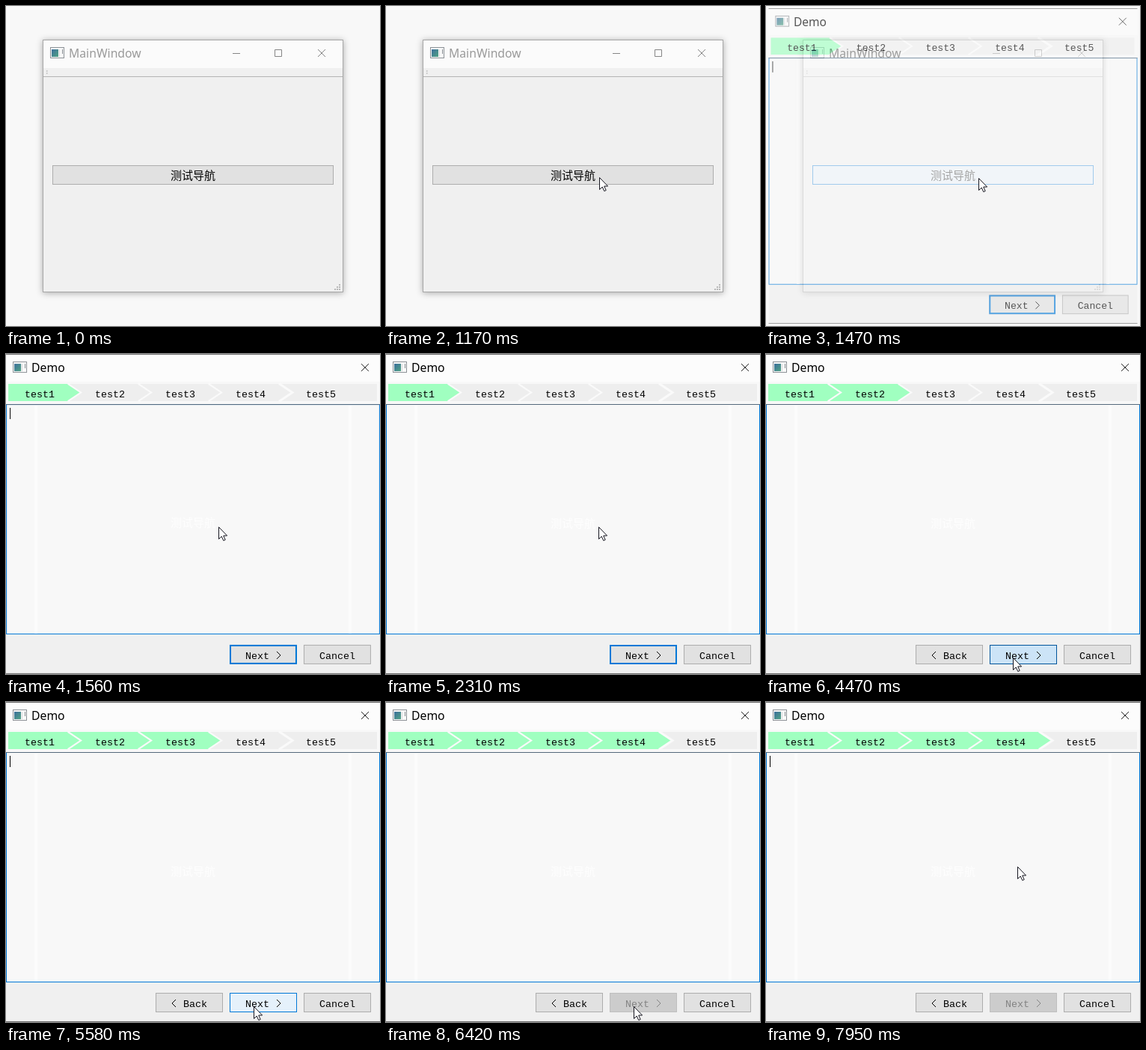
Recreate the animation shown at these times as an HTML page. Size 500 by 428 pixels, loop 8 s.

```html
<!DOCTYPE html>
<html lang="zh">
<head>
<meta charset="utf-8">
<title>Wizard navigation</title>
<style>
  html, body { margin: 0; width: 100%; height: 100%; overflow: hidden; background: #f8f8f8; }
  svg { display: block; width: 500px; height: 428px; }
  .title { font: 15.75px "Noto Sans", "Open Sans", sans-serif; }
  .mono { font: 13.33px "Liberation Mono", "Noto Sans Mono", monospace; text-anchor: middle; white-space: pre; }
  .cjk { font: 15px "Noto Sans CJK SC", "Noto Sans CJK", sans-serif; text-anchor: middle; }
  .line { fill: none; stroke-width: 1; }
  .shadow { filter: drop-shadow(0 1px 4px rgba(0, 0, 0, .32)); }
</style>
</head>
<body>
<svg viewBox="0 0 500 428">
  <defs>
    <linearGradient id="teal" x2="1" y2="1">
      <stop stop-color="#3d6f9c"/><stop offset="1" stop-color="#4fa283"/>
    </linearGradient>
    <g id="icon">
      <rect x=".5" y=".5" width="18" height="14" fill="#fafafa" stroke="#8c9196"/>
      <rect x="2" y="3" width="9" height="10" fill="url(#teal)"/>
      <path d="M12.5 3V13" stroke="#d5d8da"/>
      <path d="M16.5 3V9" stroke="#858b91"/>
    </g>
  </defs>

  <rect width="500" height="428" fill="#f8f8f8"/>

  <g id="main">
    <rect class="shadow" x="49.5" y="45.5" width="401" height="337" fill="#f0f0f0" stroke="#a6a6a6"/>
    <rect x="50" y="46" width="400" height="37" fill="#fbfbfb"/>
    <use href="#icon" x="59" y="55"/>
    <text id="mainTitle" class="title" x="84" y="69">MainWindow</text>
    <path class="line" stroke="#858585" d="M303 63.5H313M359.5 58.5H368.5V67.5H359.5ZM417 58L427 68M427 58L417 68"/>
    <path d="M54 87h1.5M54 90h1.5" stroke="#9a9a9a"/>
    <path d="M50 94.5H450" stroke="#b4b4b4"/>
    <rect id="mainButton" x="62.5" y="213.5" width="375" height="25"/>
    <text class="cjk" x="250" y="231.5">测试导航</text>
    <path id="grip" fill="#b8b8b8"/>
  </g>

  <g id="dialog">
    <rect width="500" height="428" fill="#f0f0f0"/>
    <rect width="500" height="37" fill="#fcfcfc"/>
    <use href="#icon" x="9" y="10"/>
    <text class="title" x="34" y="24">Demo</text>
    <path class="line" stroke="#222" d="M475 13L485 23M485 13L475 23"/>
    <rect x="0" y="37" width="500" height="30" fill="#f8f8f8"/>
    <rect x="3" y="40" width="493" height="23" fill="#eeeeee"/>
    <g id="steps"></g>
    <rect x=".5" y="67.5" width="499" height="307" fill="#f8f8f8" stroke="#0078d7"/>
    <path d="M0 67.5H500" stroke="#55697c"/>
    <path d="M40 69V374M460 69V374" stroke="#fcfcfc" stroke-width="4"/>
    <text class="cjk" x="250" y="231.5" fill="#fefefe">测试导航</text>
    <path id="caret" d="M5.5 72V87" stroke="#000"/>
    <g id="buttons"></g>
    <path d="M0 .5H500M0 427.5H500" stroke="#707070"/>
  </g>

  <path id="cursor" d="M.5 .5V16.5L4.2 13L6.8 18.6L9.2 17.5L6.7 12H11.6Z" fill="#fff" stroke="#15151f" stroke-linejoin="round"/>
</svg>
<script>
const LOOP = 8000, TICK = 30, PITCH = 94;
const $ = id => document.getElementById(id);

function add(parent, tag, attrs, text = '') {
  const node = document.createElementNS('http://www.w3.org/2000/svg', tag);
  set(node, attrs);
  node.textContent = text;
  return parent.appendChild(node);
}
function set(node, attrs) {
  for (const key in attrs) node.setAttribute(key, attrs[key]);
}

// Size grip dots
let dots = '';
for (let row = 0; row < 3; row++)
  for (let col = 2 - row; col < 3; col++) dots += `M${439 + col * 3} ${372 + row * 3}h2v2h-2z`;
set($('grip'), { d: dots });

// Step bar
const arrows = [];
for (let i = 0; i < 5; i++) {
  const x = i * PITCH, notch = i ? x + 8 : 3;
  const shape = i ? `M${x - 9} 40H${x + 82}L${x + 99} 51.5L${x + 82} 63H${x - 9}L${notch} 51.5Z`
                  : 'M3 40H82L99 51.5L82 63H3Z';
  if (i < 4) {
    arrows.push(add($('steps'), 'path', { d: shape, fill: '#a0ffc0' }));
    add($('steps'), 'path', {
      d: `M${x + 83} 39.5L${x + 101} 51.5L${x + 83} 63.5`,
      class: 'line', stroke: '#fafafa', style: 'stroke-width:3'
    });
  }
}
for (let i = 0; i < 5; i++)
  add($('steps'), 'text', { class: 'mono', x: 45 + i * PITCH, y: 58 }, `test${i + 1}`);

// Dialog buttons
const STYLES = {
  normal:   { fill: '#e1e1e1', stroke: '#adadad' },
  hover:    { fill: '#e5f1fb', stroke: '#0078d7' },
  pressed:  { fill: '#cce4f7', stroke: '#00559b' },
  disabled: { fill: '#cccccc', stroke: '#bfbfbf' }
};
function button(x, label, style, ink = '#000') {
  const group = add($('buttons'), 'g', {});
  const box = add(group, 'rect', { x: x + .5, y: 389.5, width: 89, height: 25, ...STYLES[style] });
  const chevron = label.includes('<') ? x + 22 : label.includes('>') ? x + 63 : 0;
  const dir = label.includes('<') ? -1 : 1;
  add(group, 'text', { class: 'mono', x: x + 45, y: 408, fill: ink }, label.replace(/[<>]/, '\u00a0'));
  if (chevron) {
    const tip = dir > 0 ? chevron + 5 : chevron, tail = dir > 0 ? chevron : chevron + 5;
    add(group, 'path', { class: 'line', stroke: ink, d: `M${tail} 398L${tip} 403L${tail} 408` });
  }
  return { group, box };
}
const back = button(200, '< Back', 'normal');
const next = button(299, 'Next >', 'normal');
const nextOff = button(299, 'Next >', 'disabled', '#838383');
button(398, 'Cancel', 'normal');
const focusRing = add(next.group, 'rect', {
  x: 300, y: 390, width: 88, height: 24, fill: 'none', stroke: '#0078d7', 'stroke-width': 2
});

// Timeline
const linear = p => p, easeIn = p => p ** 1.5, easeOut = p => 1 - (1 - p) ** 2;
const smooth = p => p * p * (3 - 2 * p);
const path = [
  [270, 494, 46], [960, 287, 229, easeOut], [1110, 287, 229], [1170, 285, 229, linear],
  [1380, 285, 229], [1470, 284, 230, linear], [1620, 284, 231, linear], [2310, 284, 231],
  [3090, 302, 325, easeIn], [3390, 325, 405, easeOut], [4050, 325, 405],
  [4170, 330, 406, smooth], [4470, 330, 406], [4680, 331, 407, linear], [7140, 331, 407],
  [7170, 332, 407, linear], [7290, 332, 407], [7560, 338, 221, smooth], [7620, 336, 220, linear]
];
const caretOn = [[1350, 1860], [2370, 2880], [3390, 4110], [4560, 5070], [5580, 6420], [6930, 7440], [7950, 8000]];
const pageTurns = [3600, 4560, 5910];
const nextStates = [[0, 'normal'], [3570, 'pressed'], [3600, 'hover'], [4470, 'pressed'],
                    [4560, 'hover'], [5820, 'pressed'], [5910, 'hover']];
const mainStates = [[0, 'normal'], [1200, 'hover'], [1260, 'pressed'], [1350, 'hover']];

const progress = (t, from, to) => Math.min(1, Math.max(0, (t - from) / (to - from)));
const stateAt = (table, t) => table.filter(([start]) => start <= t).pop()[1];
const show = (node, on) => { node.style.visibility = on ? 'visible' : 'hidden'; };

function cursorAt(t) {
  const i = path.findIndex(([time]) => time > t);
  if (i < 0) return path[path.length - 1].slice(1, 3);
  if (i === 0) return path[0].slice(1, 3);
  const [t0, x0, y0] = path[i - 1], [t1, x1, y1, ease = linear] = path[i];
  const p = ease(progress(t, t0, t1));
  return [x0 + (x1 - x0) * p, y0 + (y1 - y0) * p].map(Math.round);
}

function render(t) {
  const page = pageTurns.filter(turn => turn <= t).length;
  const scale = .9 + .1 * (1 - (1 - progress(t, 1350, 1600)) ** 3);

  set($('mainTitle'), { fill: t < 1260 ? '#999' : '#000' });
  set($('mainButton'), STYLES[stateAt(mainStates, t)]);

  show($('dialog'), t >= 1350);
  set($('dialog'), {
    opacity: progress(t, 1340, 1540),
    transform: `translate(250 214) scale(${scale}) translate(-250 -214)`
  });
  arrows.forEach((arrow, i) => set(arrow, { fill: i <= page ? '#a0ffc0' : '#eeeeee' }));
  set($('caret'), { opacity: +caretOn.some(([on, off]) => t >= on && t < off) });

  set(back.group, { opacity: +(page > 0) });
  set(next.box, STYLES[stateAt(nextStates, t)]);
  set(focusRing, { opacity: +(t < 3570) });
  set(nextOff.group, { opacity: progress(t, 5880, 6150) });

  show($('cursor'), t >= 270);
  set($('cursor'), { transform: `translate(${cursorAt(t)})` });
}

const start = performance.now();
function frame(now) {
  const t = Math.max(0, now - start) % LOOP;
  render(Math.floor(t / TICK) * TICK);
  requestAnimationFrame(frame);
}
render(0);
requestAnimationFrame(frame);
</script>
</body>
</html>
```
